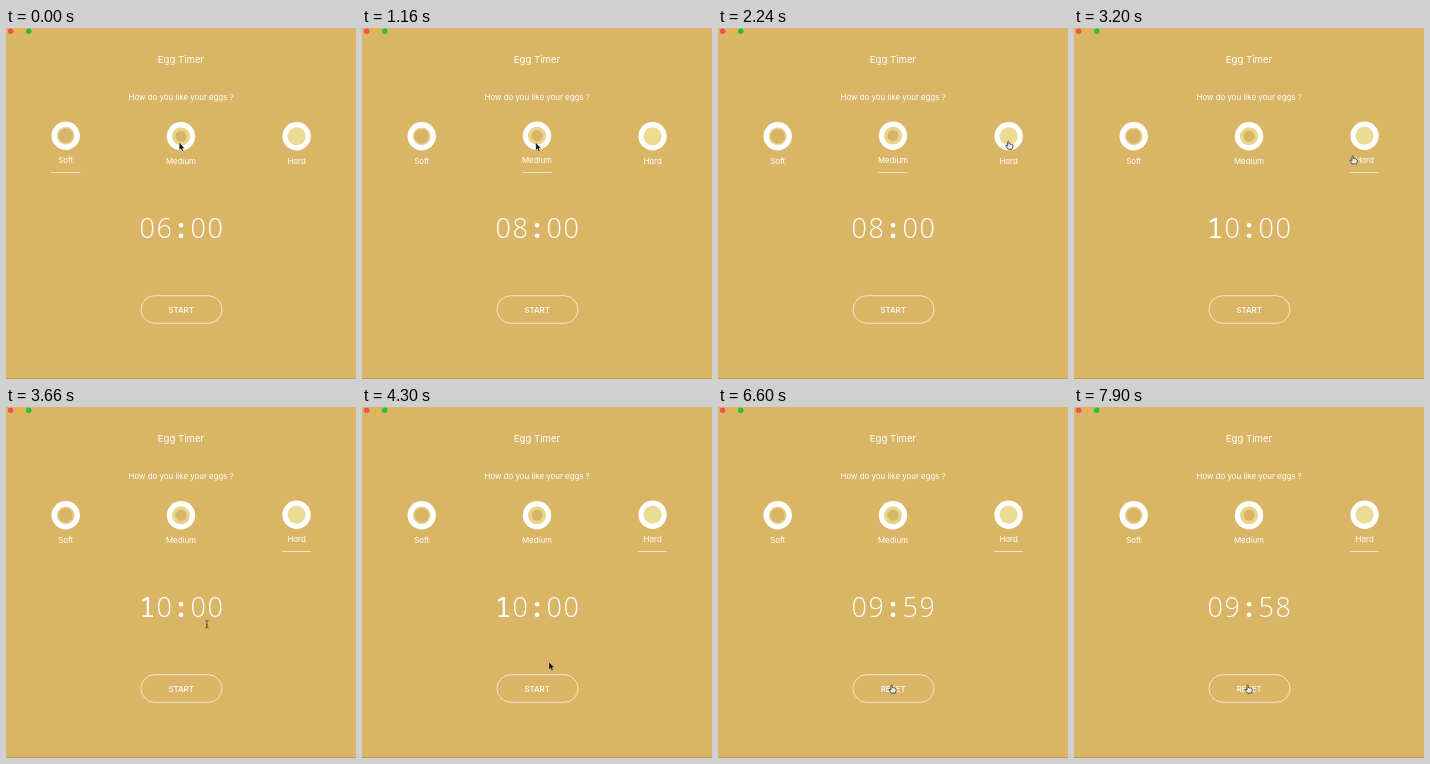
Animation, 350 px wide and 351 px high, one loop 8000 ms. Source, as an HTML page:

```html
<!DOCTYPE html>
<html lang="en">
<head>
<meta charset="utf-8">
<title>Egg Timer</title>
<style>
  html, body { margin: 0; width: 100%; height: 100%; overflow: hidden; background: #dab566; }
  svg { display: block; width: 350px; height: 351px; }
  text {
    font-family: Inter, sans-serif; font-size: 7.9px; font-feature-settings: "cv11";
    fill: #fff; text-anchor: middle;
  }
  .title { font-size: 9.6px; }
  .clock { font-family: "Open Sans", sans-serif; font-size: 27px; font-weight: 300; }
  .serif { font-family: "Noto Sans Mono", monospace; }
  .colon { font-weight: 700; }
  .button { font-weight: 500; }
</style>
</head>
<body>
<svg viewBox="0 0 350 351">
  <defs>
    <radialGradient id="soft">
      <stop offset=".7" stop-color="#dab466"/>
      <stop offset=".82" stop-color="#e4cb82"/>
      <stop offset=".92" stop-color="#ecdda5"/>
      <stop offset="1" stop-color="#fff"/>
    </radialGradient>
    <radialGradient id="medium">
      <stop offset=".53" stop-color="#dab466"/>
      <stop offset=".63" stop-color="#e7d084"/>
      <stop offset=".92" stop-color="#ebd98f"/>
      <stop offset="1" stop-color="#f8f1d6"/>
    </radialGradient>
    <radialGradient id="hard">
      <stop offset=".9" stop-color="#ecdc93"/>
      <stop offset="1" stop-color="#f6eecb"/>
    </radialGradient>
  </defs>
  <rect width="350" height="351" fill="#dab566"/>
  <rect y="350" width="350" height="1" fill="#b99c5a"/>
  <circle cx="4.7" cy="3.3" r="2.7" fill="#f2524c"/>
  <circle cx="13.6" cy="3.3" r="2.7" fill="#ebb43c"/>
  <circle cx="22.7" cy="3.3" r="2.7" fill="#25bf37"/>

  <text class="title" x="175" y="34.6">Egg Timer</text>
  <text x="175.2" y="72.2">How do you like your eggs ?</text>
  <g id="eggs"></g>
  <rect id="bar" y="144" width="29" height="1" fill="#fff" opacity=".62"/>
  <g id="clock"></g>
  <rect x="135" y="267.7" width="81" height="27.6" rx="13.8" fill="none" stroke="#fff" stroke-width=".9" opacity=".75"/>
  <text id="label" class="button" x="175.2" y="284.9"></text>

  <circle id="ring" fill="none" stroke="#fff" stroke-width="1" opacity=".3"/>
  <g id="cursor">
    <path id="arrow" d="M0 0V7.6L1.7 6.1L2.8 8.7L4.1 8.1L3 5.6H5.2Z" fill="#151515" stroke="#fff" stroke-opacity=".55" stroke-width=".4"/>
    <path id="hand" transform="translate(-.7 -.6)" d="M-.6 4.2V.7Q0-.3.7.7V2.9Q1.6 2.4 2.1 3.2Q3 2.7 3.4 3.6Q4.6 3.3 4.6 4.5V6.1L3.7 8.3H-.3L-2.5 5.2Q-2.6 4.1-1.6 4.3L-.6 5.2Z" fill="#f0ece4" stroke="#333" stroke-width=".8"/>
    <path id="beam" d="M-1.6-3.6Q0-3.6 0-2.7Q0-3.6 1.6-3.6M0-2.7V2.7M-1.6 3.6Q0 3.6 0 2.7Q0 3.6 1.6 3.6M-.9 .9H.9" fill="none" stroke="#222" stroke-opacity=".8" stroke-width=".8"/>
  </g>
</svg>
<script>
const LOOP = 8000;
const $ = id => document.getElementById(id);

function add(parent, tag, attrs, content = '') {
  const el = document.createElementNS('http://www.w3.org/2000/svg', tag);
  set(el, attrs);
  el.textContent = content;
  parent.append(el);
  return el;
}

function set(el, attrs) {
  for (const key in attrs) el.setAttribute(key, attrs[key]);
}

const eggs = [['Soft', 59.7], ['Medium', 175], ['Hard', 290.6]].map(([name, x]) => {
  const egg = add($('eggs'), 'g', {});
  add(egg, 'circle', { cx: x, cy: 108.3, r: 14.2, fill: '#fff' });
  add(egg, 'circle', { cx: x, cy: 108.3, r: 9.3, fill: `url(#${name.toLowerCase()})` });
  add(egg, 'text', { x, y: 136.1 }, name);
  return { egg, x };
});

const digits = [0, 1, 2, 3, 4].map(i =>
  add($('clock'), 'text', { x: 141.2 + i * 17, y: 209.7 }));
const extra = { 1: ' serif', ':': ' colon' };

// Each entry: start time, value
const times = [[0, '06:00'], [420, '08:00'], [2620, '10:00'], [6600, '09:59'], [7780, '09:58']];
const choices = [[0, 0], [420, 1], [2620, 2]];
const labels = [[0, 'START'], [5440, 'RESET']];
const at = (list, t) => list.filter(item => item[0] <= t).pop()[1];

// Pointer tip: time, x, y
const path = [
  [0, 173.3, 114.6], [1140, 173.3, 114.6], [1380, 212, 117], [1620, 264, 116.6],
  [1800, 279, 117], [1940, 284, 117], [2100, 289, 114.5], [2240, 291, 113.6],
  [3060, 291, 113.6], [3220, 277, 131], [3440, 236, 177], [3660, 201, 217],
  [3860, 189, 245], [3980, 188, 251], [4100, 187, 255], [4600, 187, 255],
  [4760, 182, 265], [4980, 175.2, 277.6], [5060, 174.3, 278.4], [LOOP, 174.3, 278.4]
];

// Monotone cubic interpolation through the pointer path
function slope(i, k) {
  const a = path[i - 1], b = path[i], c = path[i + 1];
  if (!a || !c) return 0;
  const m = (b[k] - a[k]) / (b[0] - a[0]);
  const n = (c[k] - b[k]) / (c[0] - b[0]);
  return m * n <= 0 ? 0 : 2 * m * n / (m + n);
}

function pointer(t) {
  const i = path.findIndex(p => p[0] > t) - 1;
  const a = path[i], b = path[i + 1];
  const span = b[0] - a[0], u = (t - a[0]) / span;
  return [1, 2].map(k =>
    a[k] * (1 + 2 * u) * (1 - u) ** 2 + b[k] * u * u * (3 - 2 * u) +
    span * u * (1 - u) * (slope(i, k) * (1 - u) - slope(i + 1, k) * u));
}

function shape(t, x, y) {
  if (x > 276 && y > 93 && y < 138) return 'hand';
  if (t > 4600 && y > 267) return 'hand';
  if (x > 130 && x < 222 && y > 182 && y < 222) return 'beam';
  return 'arrow';
}

function draw(t) {
  [...at(times, t)].forEach((c, i) => {
    if (digits[i].textContent === c) return;
    digits[i].textContent = c;
    set(digits[i], { class: 'clock' + (extra[c] || '') });
  });

  // The chosen egg sits slightly higher
  const chosen = at(choices, t);
  eggs.forEach(({ egg }, i) => set(egg, { transform: `translate(0 ${i === chosen ? -0.6 : 0})` }));
  set($('bar'), { x: eggs[chosen].x - 14.5 });
  $('label').textContent = at(labels, t);

  const [x, y] = pointer(t);
  const kind = shape(t, x, y);
  set($('cursor'), { transform: `translate(${x} ${y})` });
  for (const id of ['arrow', 'hand', 'beam']) {
    set($(id), { visibility: id === kind ? 'visible' : 'hidden' });
  }

  const press = [2400, 5280].find(p => t >= p && t < p + 60);
  set($('ring'), press === undefined ? { r: 0, visibility: 'hidden' }
    : { cx: x, cy: y, r: 5 + (t - press) / 6, visibility: 'visible' });
}

const start = performance.now();
function tick() {
  draw((performance.now() - start) % LOOP);
  requestAnimationFrame(tick);
}
tick();
</script>
</body>
</html>
```
